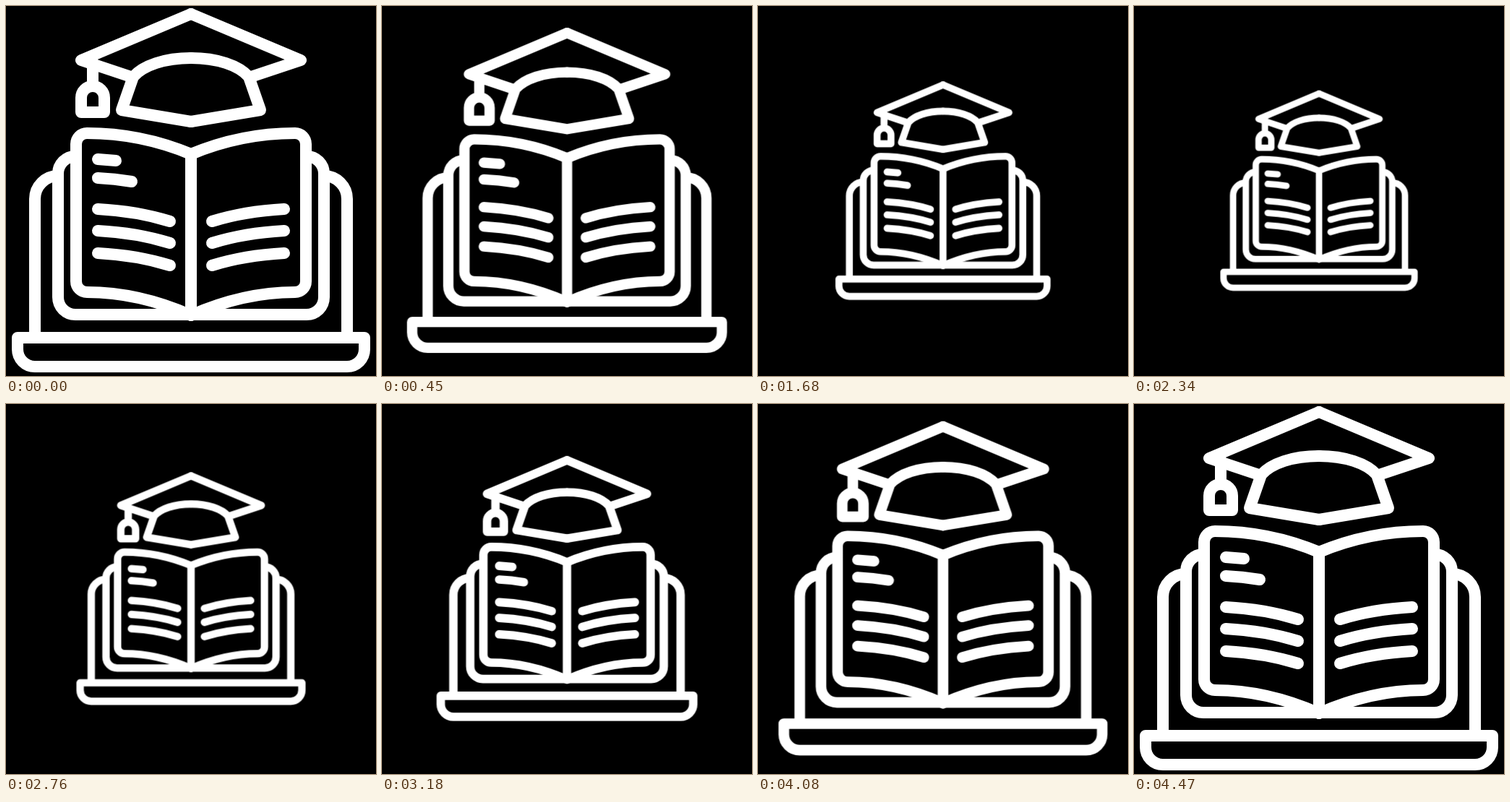
Animation, 512 px wide and 512 px high, one loop 4.5 s. Source, as an HTML page:

```html
<!DOCTYPE html>
<html lang="en">
<head>
<meta charset="utf-8">
<title>Online learning</title>
<style>
  html, body { margin: 0; width: 100%; height: 100%; overflow: hidden; background: #000; }
  svg { display: block; width: 100%; height: 100%; }
  .icon {
    fill: none;
    stroke: #fff;
    stroke-width: 16;
    stroke-linecap: round;
    stroke-linejoin: round;
    transform-origin: 256px 256px;
    animation: pulse 4500ms infinite;
  }
  /* shrink for 2100 ms, grow for 2370 ms, hold 30 ms; one step per 30 ms */
  @keyframes pulse {
    0% { transform: scale(1); animation-timing-function: steps(70, end); }
    46.66667% { transform: scale(.5); animation-timing-function: steps(79, end); }
    99.33333%, 100% { transform: scale(1); }
  }
</style>
</head>
<body>
<svg viewBox="0 0 512 512">
  <defs>
    <g id="half">
      <!-- screen edge, cover, page -->
      <path d="M40 459V267a32 32 0 0 1 32-32" stroke-linecap="butt"/>
      <path d="M96 208a24 24 0 0 0-24 24V403a24 24 0 0 0 24 24H256" stroke-linecap="butt"/>
      <path d="M256 205C213 187 165 176 112 176a15 15 0 0 0-15 15V381a15 15 0 0 0 15 15C165 396 213 409 256 428"/>
      <!-- text lines -->
      <path d="M127 281Q182 284 227 298M127 311Q182 314 227 328M127 342Q182 345 227 359"/>
      <!-- mortarboard -->
      <path d="M256 11L104 75L170 97"/>
      <path d="M256 72C220 72 190 82 176 98L160 144L256 160"/>
    </g>
  </defs>
  <g class="icon">
    <use href="#half"/>
    <use href="#half" transform="matrix(-1 0 0 1 512 0)"/>
    <path d="M256 205V427"/>
    <path d="M127 212L152 214M127 238Q150 239 174 243"/>
    <path d="M120 78V109M104 147V127a16 16 0 0 1 32 0V147z"/>
    <path d="M16 459H496V475a24 24 0 0 1-24 24H40a24 24 0 0 1-24-24z"/>
  </g>
</svg>
</body>
</html>
```
